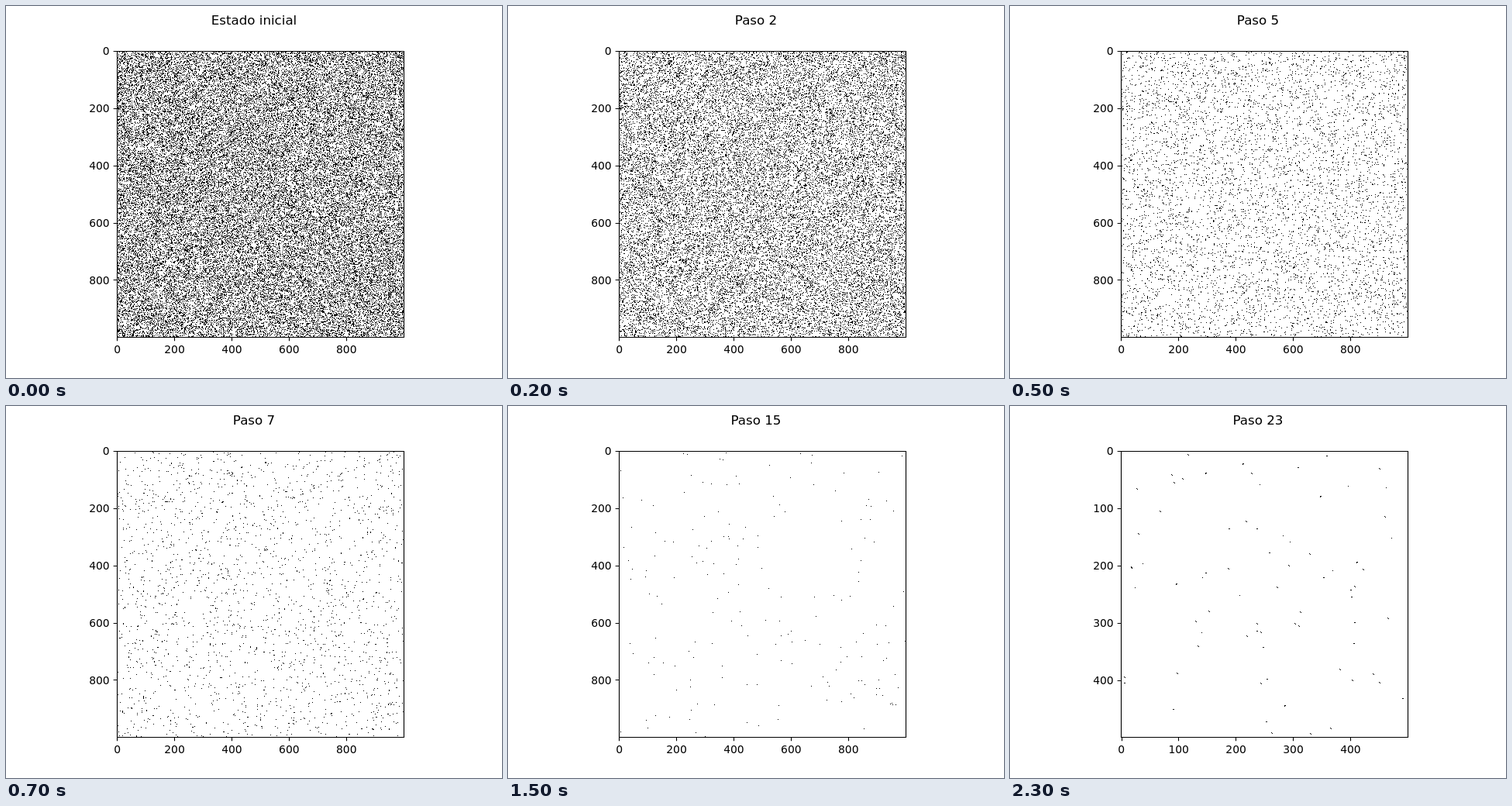
Write an HTML page with a canvas that moves like this. It is 640 px wide and 480 px high and loops after 2.4 s.

```html
<!DOCTYPE html>
<html lang="es">
<head>
<meta charset="utf-8">
<title>Autómata</title>
<style>
  html, body { margin: 0; width: 100%; height: 100%; overflow: hidden; background: #fff; }
  canvas, svg { position: absolute; display: block; }
  canvas { left: 143px; top: 58px; }
  svg { left: 0; top: 0; }
  text { font: 13.889px "DejaVu Sans", sans-serif; fill: #000; }
  #title { font-size: 16.667px; }
  path { fill: none; stroke: #000; stroke-width: 1.111; }
</style>
</head>
<body>
<canvas id="grid" width="370" height="369"></canvas>
<svg width="640" height="480" viewBox="0 0 640 480">
  <path d="M143.5 58.5H513.5V427.5H143.5Z" stroke-linejoin="miter"/>
  <g id="large"></g>
  <g id="small"></g>
  <text id="title" x="320" y="24" text-anchor="middle">Estado inicial</text>
</svg>
<script>
const STEP = 100, STEPS = 24, SWITCH = 21;
const W = 370, H = 369;
const LEFT = 143.2, TOP = 57.6, SIDE = 369.6;
const DENSITY = [.3, .25, .185, .125, .076, .046, .027, .016, .0095, .0058, .0036, .0023];

const byId = id => document.getElementById(id);
const ctx = byId('grid').getContext('2d');
const image = ctx.createImageData(W, H);
const pixels = new Uint32Array(image.data.buffer);
const WHITE = 0xffffffff, BLACK = 0xff000000;

function randomizer(seed) {
  return () => {
    seed = seed + 0x6d2b79f5 | 0;
    let t = Math.imul(seed ^ seed >>> 15, 1 | seed);
    t = t + Math.imul(t ^ t >>> 7, 61 | t) ^ t;
    return ((t ^ t >>> 14) >>> 0) / 4294967296;
  };
}

function buildAxes(group, cells) {
  const snap = v => Math.floor(v + .5) + .5;
  let ticks = '', labels = '';
  for (let i = 0; i < 5; i++) {
    const value = i * cells / 5;
    const offset = (value + .5) * SIDE / cells;
    const x = LEFT + offset, y = TOP + offset;
    ticks += `M${snap(x)} 427.5v4.86M143.5 ${snap(y)}h-4.86`;
    labels += `<text x="${x + .2}" y="448" text-anchor="middle">${value}</text>` +
      `<text x="133.7" y="${Math.round(y + 5.05)}" text-anchor="end">${value}</text>`;
  }
  group.innerHTML = `<path d="${ticks}"/>${labels}`;
}

// A cell is black while its score lies below the density; a few copy a neighbour.
const random = randomizer(41);
const scores = new Float32Array(W * H);
for (let i = 0; i < scores.length; i++) {
  const copy = random(), score = random();
  if (i > W && copy < .06) {
    scores[i] = scores[copy < .03 ? i - 1 : i - W] + .002;
  } else {
    scores[i] = score;
  }
}

const place = randomizer(77);
const specks = Array.from({ length: 79 }, () => ({
  x: Math.floor(place() * (W - 3)) + 1,
  y: Math.floor(place() * (H - 3)) + 1,
  shape: place()
}));

function density(step) {
  return step < DENSITY.length ? DENSITY[step] : .0013 + .001 * Math.exp((11 - step) / 2.5);
}

function drawLarge(step) {
  const limit = density(step);
  for (let i = 0; i < scores.length; i++) pixels[i] = scores[i] < limit ? BLACK : WHITE;
}

function drawSmall(step) {
  pixels.fill(WHITE);
  for (const { x, y, shape } of specks.slice(0, 79 - 2 * (step - SWITCH))) {
    const i = y * W + x;
    pixels[i] = BLACK;
    if (shape < .4) pixels[i + W + 1] = BLACK;
    else if (shape < .75) pixels[i + 1] = BLACK;
    if (shape > .68 && shape < .75) pixels[i + W] = BLACK;
  }
}

function draw(step) {
  const small = step >= SWITCH;
  (small ? drawSmall : drawLarge)(step);
  ctx.putImageData(image, 0, 0);
  byId('large').style.display = small ? 'none' : '';
  byId('small').style.display = small ? '' : 'none';
  byId('title').textContent = step ? `Paso ${step}` : 'Estado inicial';
}

buildAxes(byId('large'), 1000);
buildAxes(byId('small'), 500);

const start = performance.now();
let shown = 0;
draw(0);

function tick() {
  const step = Math.floor((performance.now() - start) / STEP) % STEPS;
  if (step !== shown) draw(shown = step);
  requestAnimationFrame(tick);
}
requestAnimationFrame(tick);
</script>
</body>
</html>
```
